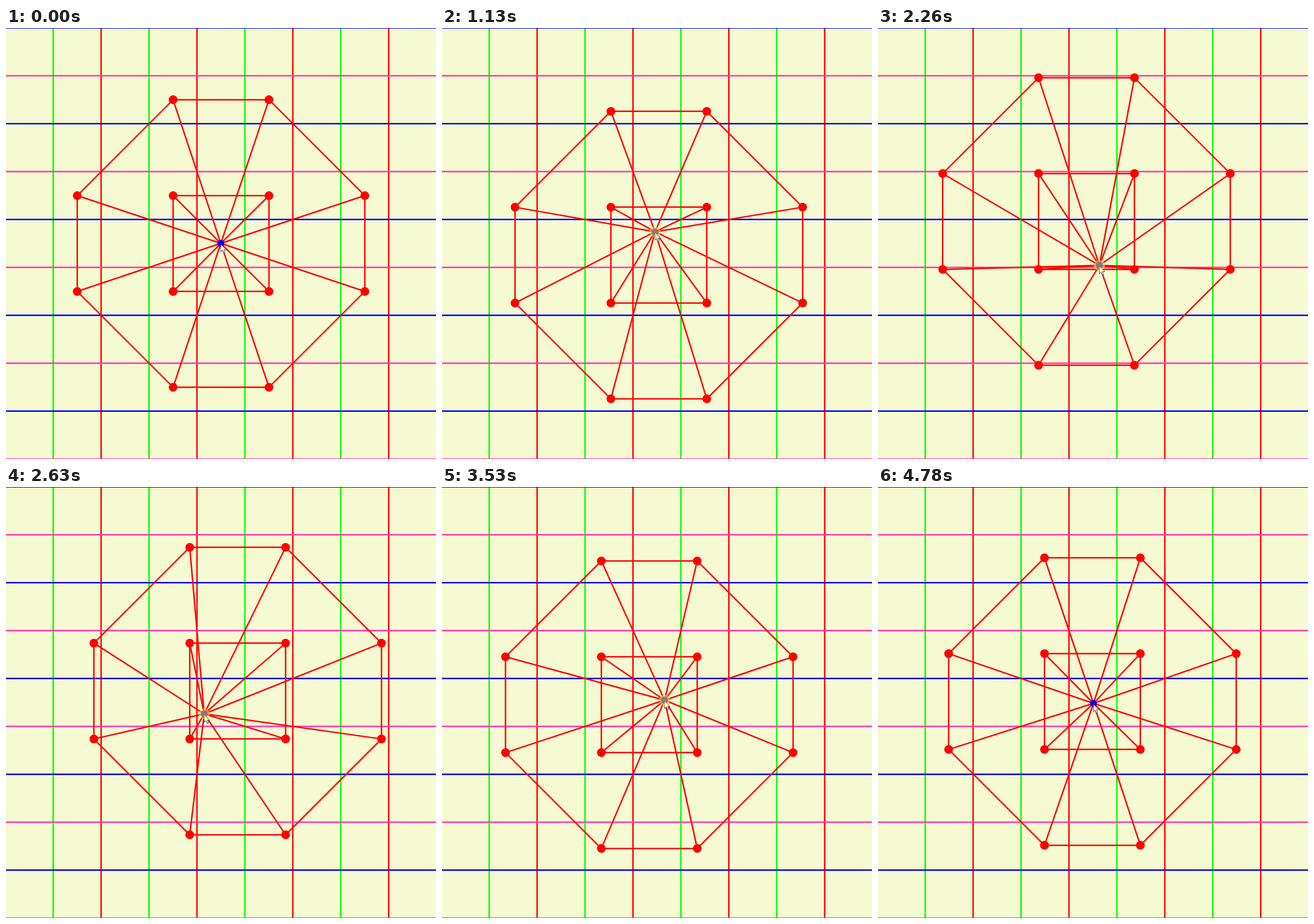
An HTML page with a canvas that plays this animation: 747x749 px, repeating every 4.85 s.

```html
<!DOCTYPE html>
<html lang="en">
<head>
<meta charset="utf-8">
<title>Point reflections on a grid</title>
<style>
html, body { margin: 0; width: 100%; height: 100%; overflow: hidden; background: #f5fad2; }
canvas { display: block; }
</style>
</head>
<body>
<canvas id="stage" width="747" height="749"></canvas>
<script>
const ctx = document.getElementById('stage').getContext('2d');
const W = 747, H = 749, LOOP = 4850, STEP = 62.6;
const CELL = 83.27, X0 = 81.95, Y0 = -0.3;
const MID = { x: X0 + 3.5 * CELL, y: Y0 + 4.5 * CELL };
const SNAP_X = X0 + 4 * CELL;
const RED = '#ff0000';
const DRAG = { from: 1, to: 76 };

// Turning points of the drag: step, x, y
const path = [
  [0, 373.2, 374.3], [5, 376.5, 385], [9, 369, 396.2], [13, 356.8, 384],
  [18, 370.1, 354.2], [22, 398, 353], [27, 422.5, 377.5], [31, 411, 399],
  [36, 384.6, 412.6], [44, 335.5, 386], [48, 349.1, 365.1], [52, 368.7, 359.6],
  [57, 389, 374], [61, 381.5, 389.8], [64, 370.1, 388.5], [70, 375, 378.8],
  [76, 374.3, 376]
];

// Smooth curve through the turning points
function pointAt(step) {
  const last = path.length - 1;
  const next = path.findIndex(key => key[0] > step);
  if (next < 0) return { x: path[last][1], y: path[last][2] };
  const a = path[next - 1], b = path[next];
  const before = path[Math.max(0, next - 2)], after = path[Math.min(last, next + 1)];
  const span = b[0] - a[0], u = (step - a[0]) / span, u2 = u * u, u3 = u2 * u;
  const axis = k => {
    const m0 = (b[k] - before[k]) / (b[0] - before[0]) * span;
    const m1 = (after[k] - a[k]) / (after[0] - a[0]) * span;
    return (2 * u3 - 3 * u2 + 1) * a[k] + (u3 - 2 * u2 + u) * m0 +
           (3 * u2 - 2 * u3) * b[k] + (u3 - u2) * m1;
  };
  return { x: axis(1), y: axis(2) };
}

function line(x1, y1, x2, y2, color) {
  ctx.strokeStyle = color;
  ctx.beginPath();
  ctx.moveTo(x1, y1);
  ctx.lineTo(x2, y2);
  ctx.stroke();
}

function dot(x, y, r, color) {
  ctx.fillStyle = color;
  ctx.beginPath();
  ctx.arc(x, y, r, 0, Math.PI * 2);
  ctx.fill();
}

function polygon(points) {
  ctx.beginPath();
  for (const [x, y] of points) ctx.lineTo(x, y);
  ctx.closePath();
}

function drawGrid() {
  ctx.fillStyle = '#f5fad2';
  ctx.fillRect(0, 0, W, H);
  ctx.lineWidth = 2.5;
  for (let k = 0; k < 8; k++) {
    const x = X0 + k * CELL;
    line(x, 0, x, H, k % 2 ? RED : '#00ff00');
  }
  for (let k = 0; k < 10; k++) {
    const y = Y0 + k * CELL;
    line(0, y, W, y, k % 2 ? '#ff33b0' : '#0000ff');
  }
}

// Quarter turns of a few corners, in cells from the figure's centre
const turns = corners => [0, 1, 2, 3].flatMap(q => corners.map(([x, y]) => {
  for (let i = 0; i < q; i++) [x, y] = [-y, x];
  return [x, y];
}));
const rings = [turns([[-1, -3], [1, -3]]), turns([[-1, -1]])];

function drawFigure(p) {
  const cx = 2 * MID.x - p.x, cy = 2 * MID.y - p.y;
  const placed = rings.map(ring => ring.map(([i, j]) => [cx + i * CELL, cy + j * CELL]));
  ctx.strokeStyle = RED;
  for (const ring of placed) {
    polygon(ring);
    ctx.stroke();
  }
  const vertices = placed.flat();
  for (const [x, y] of vertices) line(p.x, p.y, x, y, RED);
  for (const [x, y] of vertices) dot(x, y, 7.6, RED);
  dot(p.x, p.y, 6, '#0000ff');
}

const arrow = [[0, 0], [0, 13], [3, 10.3], [5.2, 15.2], [7.4, 14.2], [5.3, 9.4], [9.4, 9.4]];

function drawCursor(x, y) {
  polygon(arrow.map(([dx, dy]) => [x + dx, y + dy]));
  ctx.fillStyle = '#ffffff';
  ctx.fill();
  ctx.lineWidth = 0.9;
  ctx.strokeStyle = '#303050';
  ctx.stroke();
}

function draw(time) {
  const step = Math.floor(time / STEP);
  const mouse = pointAt(step);
  drawGrid();
  drawFigure({ x: Math.min(mouse.x, SNAP_X), y: mouse.y });
  drawCursor(mouse.x, mouse.y + 1.5);
  if (step >= DRAG.from && step < DRAG.to) dot(mouse.x, mouse.y, 9.5, 'rgba(255, 240, 40, 0.5)');
}

const start = performance.now();
function loop() {
  draw((performance.now() - start) % LOOP);
  requestAnimationFrame(loop);
}
loop();
</script>
</body>
</html>
```
